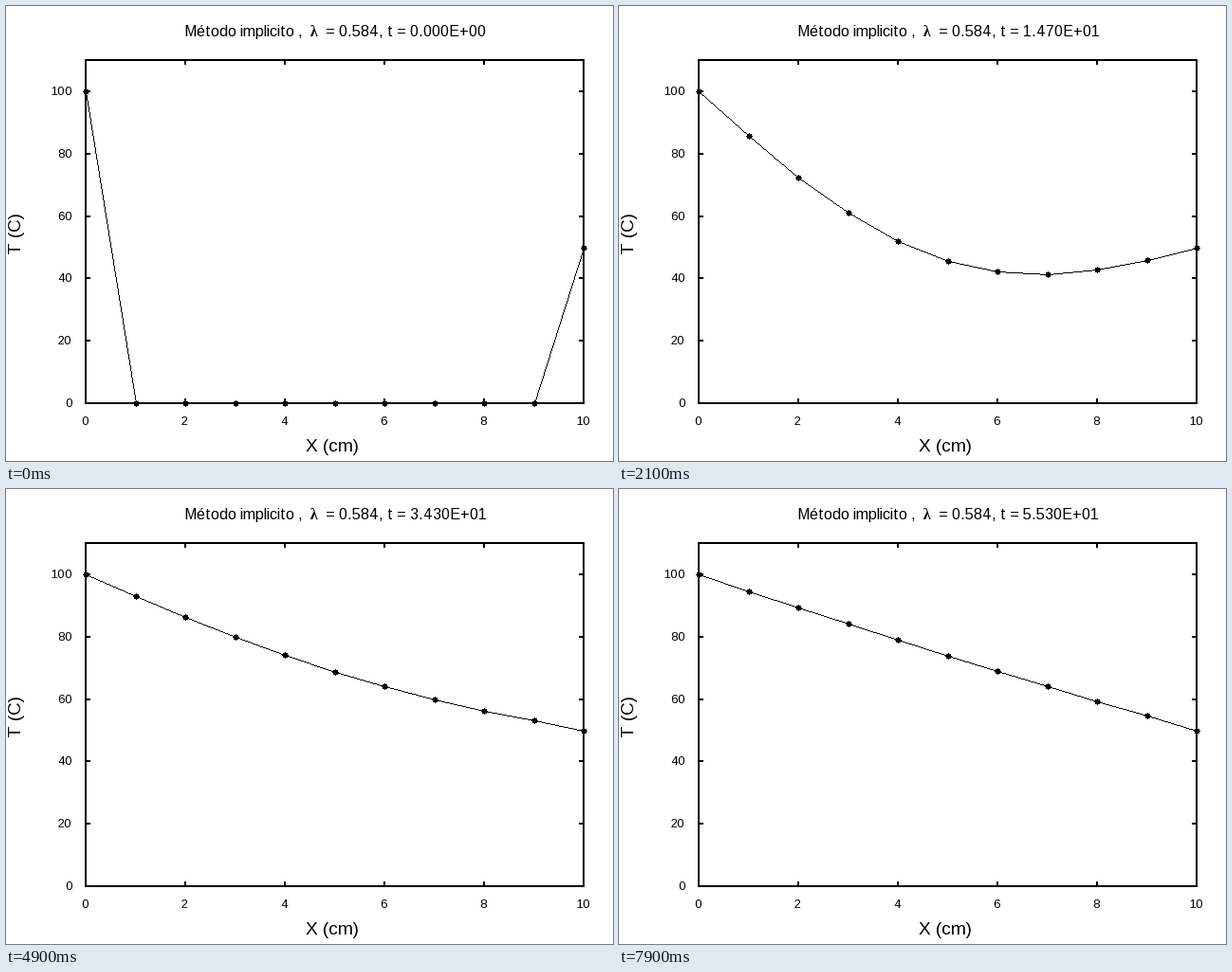
These frames come from a looping animation (640x480 px, 8 s). A matplotlib script:

```python
import matplotlib.pyplot as plt
import numpy as np
from matplotlib.animation import FuncAnimation
from matplotlib.collections import PolyCollection

W, H, DPI = 640, 480, 100
PX = 72 / DPI  # points per pixel
LEFT, RIGHT, TOP, BOTTOM = 84, 609, 57, 419
FRAMES, INTERVAL = 80, 100

# Heat equation in a rod, implicit scheme
DT, K = 0.7, 0.835
LAM = K * DT
NODES = 11
T_LEFT, T_RIGHT = 100.0, 50.0

plt.rcParams["font.family"] = "Liberation Sans"
plt.rcParams["text.hinting"] = "force_autohint"
plt.rcParams["text.hinting_factor"] = 1

PIXEL = np.array([(0, 0), (1, 0), (1, 1), (0, 1)])


def to_x(x):
    return np.floor(LEFT + (RIGHT - LEFT) * np.asarray(x) / 10 + 0.5)


def to_y(temp):
    return np.floor(BOTTOM - 3.29 * np.asarray(temp) + 0.5)


def solve():
    """Temperature profile for every time step."""
    n = NODES - 2
    matrix = (1 + 2 * LAM) * np.eye(n) - LAM * (np.eye(n, k=1) + np.eye(n, k=-1))
    temp = np.zeros(NODES)
    temp[0], temp[-1] = T_LEFT, T_RIGHT
    rows = [temp.copy()]
    for _ in range(FRAMES - 1):
        rhs = temp[1:-1].copy()
        rhs[0] += LAM * T_LEFT
        rhs[-1] += LAM * T_RIGHT
        temp[1:-1] = np.linalg.solve(matrix, rhs)
        rows.append(temp.copy())
    return rows


def segment(start, end):
    """Pixels of a one-pixel line without smoothing."""
    steps = int(np.abs(end - start).max())
    t = np.linspace(0, 1, steps + 1)[:, None]
    return np.floor(start + (end - start) * t + 0.5)


def squares(points):
    return points[:, None, :] + PIXEL


profiles = solve()

# Point symbol: 5 x 5 block with a nub on each side
side = np.arange(-3, 4)
grid = np.stack(np.meshgrid(side, side), axis=-1).reshape(-1, 2)
reach = np.abs(grid)
DOT = grid[(reach.max(axis=1) <= 2) | (reach.sum(axis=1) == 3)
           & (reach.min(axis=1) == 0)]

fig = plt.figure(figsize=(W / DPI, H / DPI), dpi=DPI, facecolor="white")
ax = fig.add_axes([0, 0, 1, 1])
ax.set_xlim(0, W)
ax.set_ylim(H, 0)
ax.axis("off")


def stroke(xs, ys):
    ax.plot(xs, ys, color="black", lw=2 * PX, antialiased=False, snap=True,
            solid_capstyle="butt", solid_joinstyle="miter")


def label(x, y, text, size, ha="left", va="baseline", **kw):
    return ax.text(x, y, text, fontsize=size * PX, ha=ha, va=va,
                   color="black", **kw)


# Frame, ticks and tick labels
stroke([LEFT, RIGHT, RIGHT, LEFT, LEFT, RIGHT],
       [TOP, TOP, BOTTOM, BOTTOM, TOP, TOP])
for value in range(0, 101, 20):
    y = to_y(value)
    if value:
        stroke([LEFT, LEFT + 5], [y, y])
        stroke([RIGHT - 5, RIGHT], [y, y])
    label(70, y + 4, str(value), 13.33, "right")
for value in range(0, 11, 2):
    x = to_x(value)
    if 0 < value < 10:
        stroke([x, x], [TOP, TOP + 5])
        stroke([x, x], [BOTTOM - 5, BOTTOM])
    label(x - 0.5, 442, str(value), 13.33, "center")

label(344, 470, "X (cm)", 18.67, "center")
label(12, 239.5, "T (C)", 18.67, "center", "center", rotation=90)

# Title
label(188, 32, "Método implicito ,", 16)
label(320, 32, "λ", 16, family="Liberation Serif", weight="bold")
title = label(337, 32, "", 16)

xs = to_x(np.arange(NODES))
curve = PolyCollection([], facecolor="black", linewidth=0, antialiased=False)
curve.set_zorder(3)
ax.add_collection(curve, autolim=False)


def update(i):
    nodes = np.column_stack([xs, to_y(profiles[i])])
    parts = [segment(a, b) for a, b in zip(nodes, nodes[1:])]
    parts += [node + DOT for node in nodes]
    curve.set_verts(squares(np.unique(np.concatenate(parts), axis=0)))
    title.set_text(f"= 0.584, t = {i * DT:.3E}")
    return curve, title


anim = FuncAnimation(fig, update, frames=FRAMES, interval=INTERVAL,
                     repeat=True, repeat_delay=0)
plt.show()
```
